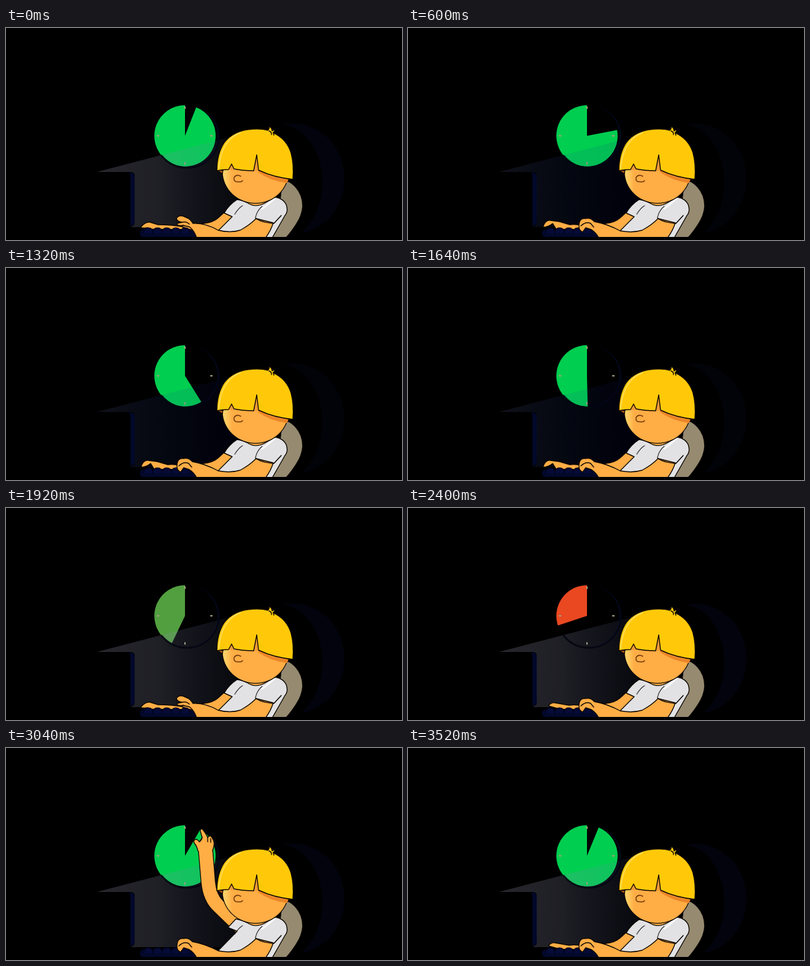
These frames come from a looping animation (646x346 px, 3560 ms). An HTML page with a canvas:

```html
<!DOCTYPE html>
<html lang="en">
<head>
<meta charset="utf-8">
<title>Typing against the timer</title>
<style>
html, body { margin: 0; width: 100%; height: 100%; overflow: hidden; background: #000; }
canvas { display: block; }
</style>
</head>
<body>
<canvas id="stage" width="646" height="346"></canvas>
<script>
const ctx = document.getElementById('stage').getContext('2d');
const LOOP = 3560, STEP = 40, KEYSTROKE = 120;
const SKIN = '#ffad45', SHIRT = '#e2e2e4', HAIR = '#ffc90a', INK = '#0a0602';
const DIAL = { x: 292, y: 176, r: 50 };

const clamp = v => Math.max(0, Math.min(1, v));
const lerp = (a, b, k) => a + (b - a) * k;
const progress = (t, from, to) => clamp((t - from) / (to - from));
const ease = k => k * k * (3 - 2 * k);
const mix = (a, b, k) => `rgb(${a.map((v, i) => Math.round(lerp(v, b[i], k)))})`;

function shape(d, fill, line = INK, width = 1.4) {
  const path = new Path2D(d);
  if (fill) { ctx.fillStyle = fill; ctx.fill(path); }
  if (line) { ctx.strokeStyle = line; ctx.lineWidth = width; ctx.stroke(path); }
}

function ellipse(x, y, rx, ry, fill) {
  ctx.fillStyle = fill;
  ctx.beginPath();
  ctx.ellipse(x, y, rx, ry, 0, 0, Math.PI * 2);
  ctx.fill();
}

function ramp(x0, x1, ...stops) {
  const g = ctx.createLinearGradient(x0, 0, x1, 0);
  stops.forEach(([at, color]) => g.addColorStop(at, color));
  return g;
}

// Degrees clockwise from twelve that have already elapsed.
function dialAngle(t) {
  if (t < 2720) return 21.4 + 0.0959 * t;
  if (t < 3040) return lerp(282, 30, ease(progress(t, 2720, 3040)));
  return lerp(30, 22.3, progress(t, 3040, 3160));
}

function drawDial(angle) {
  const { x, y, r } = DIAL;
  ellipse(x + 4, y + 1, 52, 51, '#03071a');
  ellipse(x + 1, y, 52, 51, '#000');
  const rad = a => (a - 90) * Math.PI / 180;
  ctx.fillStyle = mix([0, 206, 80], [233, 72, 33], progress(angle, 181, 251));
  ctx.beginPath();
  ctx.moveTo(x, y);
  ctx.arc(x, y, r, rad(angle), rad(360));
  ctx.fill();
  ctx.fillStyle = '#a4a17c';
  for (const [dx, dy] of [[0, -46], [0, 45]]) ctx.fillRect(x + dx - 1, y + dy - 2, 2, 4);
  for (const dx of [-44, 43]) ctx.fillRect(x + dx - 2, y - 1, 4, 2);
}

function drawLight(dim) {
  const beam = 'M148 235 L366 178 L400 200 V325 H204 L210 320 V241 Q210 235 203 235 Z';
  const glow = dim
    ? ramp(150, 375, [0, 'rgba(110,110,170,.15)'], [0.45, 'rgba(40,75,160,.11)'], [1, 'rgba(0,0,120,.09)'])
    : ramp(150, 375, [0, 'rgba(145,140,165,.27)'], [0.45, 'rgba(140,140,170,.22)'], [1, 'rgba(100,120,180,.08)']);
  shape(beam, glow, null);
  ctx.save();
  ctx.clip(new Path2D(beam));
  ctx.strokeStyle = 'rgba(2,4,14,.8)';
  ctx.lineWidth = 3;
  ctx.beginPath();
  ctx.ellipse(DIAL.x + 3, DIAL.y + 1, 52, 51, 0, 0, Math.PI * 2);
  ctx.stroke();
  ctx.restore();
  shape('M200 236 Q210 235 210 243 V319 L203 324 L201 319 Z', '#02082a', null);
  shape('M148 235 H197 Q203 236 203 243 V323 H148 Z', '#000', null);
}

function drawBackGlow(dim) {
  ellipse(469, 246, 83, 90, dim ? '#020209' : '#03030e');
  ellipse(448, 252, 68, 94, '#000');
}

function drawChair() {
  shape('M450 249 Q461 247 472 259 Q484 272 484 291 Q483 306 473 321 Q464 335 456 343 H426 Q448 305 450 249 Z', '#968a70');
}

const farHands = {
  raised: 'M219 326 Q227 316 235 317 L248 321 Q270 321 286 324 L306 331 L300 340 H228 L231 326 Q226 327 219 326 Z',
  arched: 'M220 325 Q224 313 232 314 L247 316 L264 321 Q281 319 300 328 L298 341 H240 L241 327 L236 319 Q229 325 220 325 Z',
  low: 'M229 323 Q233 317 240 318 L263 322 Q281 319 306 330 L298 341 H247 L243 327 Z'
};

function drawFarArm(lift) {
  const at = (x0, y0, x1, y1) => [lerp(x0, x1, lift), lerp(y0, y1, lift)];
  const shoulder = at(374, 297, 381, 291);
  const elbow = at(342, 326, 332, 244);
  const wrist = at(280, 333, 325, 160);
  const near = elbow.map((v, i) => lerp(v, shoulder[i], 0.3));
  const far = elbow.map((v, i) => lerp(v, wrist[i], 0.3));
  ctx.beginPath();
  ctx.moveTo(...shoulder);
  ctx.lineTo(...near);
  ctx.quadraticCurveTo(...elbow, ...far);
  ctx.lineTo(...wrist);
  const width = lerp(17, 22, lift);
  for (const [color, w] of [[INK, width + 2.6], [SKIN, width]]) {
    ctx.strokeStyle = color;
    ctx.lineWidth = w;
    ctx.stroke();
  }
  if (lift < 0.25) return;
  ctx.save();
  ctx.translate(...wrist);
  ctx.rotate((1 - lift) * -1.3);
  ctx.translate(-325, -160);
  shape('M313 168 Q312 161 307 155 Q305 149 311 149 L316 153 L320 146 L317 136 Q317 130 321 133 Q326 139 329 146 Q334 140 337 148 Q342 153 337 168', SKIN);
  shape('M320 146 Q319 151 315 153 M329 146 V153 M334 148 V154', null);
  ctx.restore();
}

function drawKeyboard() {
  shape('M218 335 Q218 328 227 328 L302 329 Q311 333 310 342 H224 Q218 341 218 335 Z', '#03082c', '#000', 1);
  for (let i = 0; i < 5; i++) {
    const x = 232 + i * 15;
    shape(`M${x - 8} 335 Q${x - 7} 326 ${x} 326 Q${x + 8} 326 ${x + 8} 335`, '#050b36', '#000214', 1.2);
  }
}

function drawShirt(lifted) {
  const sleeve = lifted ? 'M362 293 L375 279' : 'M356 302 Q363 289 377 280';
  const cuff = lifted ? 'L377 299 L362 293 Z' : 'L369 308 L356 302 Z';
  shape('M393 283 L396 292 Q410 296 425 289 L428 278 Z', SKIN);
  shape(sleeve + ' Q386 281 395 286 Q409 295 427 283 L440 276 Q453 279 457 288 Q461 299 455 306 L434 343 H372 L345 332 ' + cuff, SHIRT);
  shape('M373 304 Q380 293 386 290 M407 309 Q410 297 418 291', null, '#222', 1.1);
  shape('M418 295 Q428 287 438 279', null, '#f7f7f7', 3);
}

const nearHands = {
  raised: 'M278 311 Q281 305 289 307 L298 311 Q303 315 305 319 Q325 318 346 330',
  flat: 'M279 321 Q280 310 289 311 Q298 309 304 316 Q326 320 346 331'
};

function drawNearArm(pose) {
  const palm = pose === 'raised'
    ? ' L311 342 Q307 331 300 325 L289 322 Q279 324 279 319 L287 317 Q279 316 278 311 Z'
    : ' L311 342 Q306 333 299 329 L290 326 L285 333 Q278 331 279 321 Z';
  shape(nearHands[pose] + ' Q366 335 382 330 Q397 322 408 311 L436 318 Q432 331 423 343' + palm, SKIN);
  shape(pose === 'raised' ? 'M287 317 Q294 315 299 320' : 'M282 323 Q290 315 298 319 L303 325', null);
  shape('M407 310 Q415 317 437 319 L449 306', null, INK, 1.6);
}

function drawHead() {
  ctx.lineWidth = 1.4;
  ellipse(407, 234, 54.7, 52.7, INK);
  ellipse(407, 234, 53.5, 51.5, ramp(353, 385, [0, '#ffd66e'], [0.25, '#ffc65c'], [0.5, SKIN], [1, SKIN]));
  shape('M412 232 Q435 245 461 247 L458 253 Q430 249 411 235 Z', '#ec8526', null);
  shape('M404 233 L409 208 L412 233 Z M363 232 L368 222 L372 231 Z', '#f39a36', null);
  shape('M344 232 L354 232 L353 238 Z', '#a8571b');
  shape('M344 233 Q344 205 356 187 Q371 167 402 165 Q417 164 427 167 Q431 164 428 160 Q434 162 434 168 Q437 166 439 167 L436 171 Q458 181 465 204 Q470 223 468 247 Q437 244 412 232 L409 207 L404 233 Q387 233 372 230 L368 222 L363 231 Q353 231 344 233 Z', HAIR);
  shape('M347 229 Q349 204 360 188 Q369 176 382 171', null, 'rgba(255,229,130,.65)', 2);
  shape('M429 168 Q434 170 433 174 M436 171 L437 175', null);
  shape('M383 242 Q376 238 372 244 Q371 252 379 251 Q384 252 386 249', null, '#70350e', 1.5);
}

function draw(t) {
  const beat = Math.floor(t / KEYSTROKE);
  const odd = beat % 2 === 1;
  const typing = t < 2400;
  const dim = odd && t < 2160;
  const lift = ease(progress(t, 2440, 2720)) * (1 - ease(progress(t, 3160, 3480)));

  ctx.fillStyle = '#000';
  ctx.fillRect(0, 0, 646, 346);
  ctx.save();
  ctx.beginPath();
  ctx.rect(0, 0, 646, 341);
  ctx.clip();
  ctx.lineJoin = ctx.lineCap = 'round';

  drawBackGlow(dim);
  drawDial(dialAngle(t));
  drawLight(dim);
  drawChair();
  drawFarArm(lift);
  if (lift < 0.25) shape(farHands[!typing ? 'low' : odd ? 'arched' : 'raised'], SKIN);
  drawKeyboard();
  drawShirt(lift > 0.3);
  drawNearArm(typing && !odd ? 'raised' : 'flat');
  drawHead();
  ctx.restore();
}

const start = performance.now();
function tick() {
  const t = (performance.now() - start) % LOOP;
  draw(Math.floor(t / STEP) * STEP);
  requestAnimationFrame(tick);
}
tick();
</script>
</body>
</html>
```
